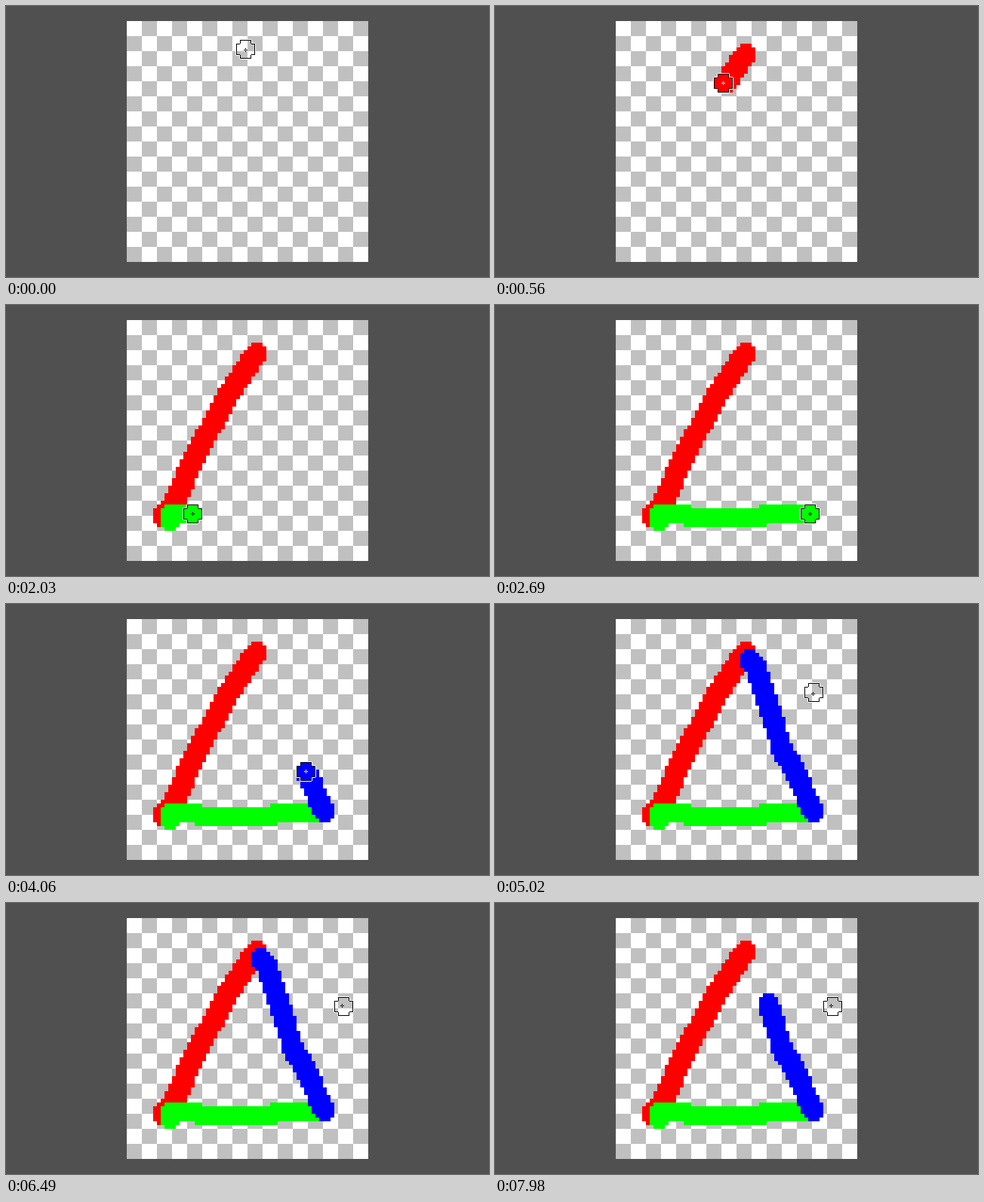
Recreate the animation shown at these times as an HTML page with a canvas. Size 640 px wide and 360 px high, loop 8000 ms.

```html
<!DOCTYPE html>
<html lang="en">
<head>
<meta charset="utf-8">
<title>Triangle painting</title>
<style>
html, body { margin: 0; width: 100%; height: 100%; overflow: hidden; background: #505050; }
canvas { display: block; }
</style>
</head>
<body>
<canvas id="stage" width="640" height="360"></canvas>
<script>
const ctx = document.getElementById('stage').getContext('2d');
const LOOP = 8000, CELL = 5, LEFT = 160, TOP = 20;

const lerp = (a, b, f) => a + (b - a) * f;
const linear = f => f;
const smooth = f => f * f * (3 - 2 * f);
const easeOut = f => 1 - (1 - f) ** 2.6;
const progress = (t, start, end) => Math.min(1, Math.max(0, (t - start) / (end - start)));

// Every grid cell the brush centre passes on the way through the key points.
function cellsAlong(points) {
  const cells = [points[0]], samples = 999;
  for (let i = 1; i < points.length; i++) {
    for (let k = 1; k <= samples; k++) {
      const [x, y] = [0, 1].map(n => Math.round(lerp(points[i - 1][n], points[i][n], k / samples)));
      const [lastX, lastY] = cells[cells.length - 1];
      if (x !== lastX || y !== lastY) cells.push([x, y]);
    }
  }
  return cells;
}

function stroke(start, end, ease, color, light, hidden, points) {
  const cells = cellsAlong(points);
  const last = t => Math.floor(ease(progress(t, start, end)) * (cells.length - 1));
  return {
    start, color, light, hidden, cells, last,
    pointer: t => {
      const [x, y] = cells[last(t)];
      return [LEFT + x * CELL + 2, TOP + y * CELL + 2];
    }
  };
}

function glide(start, end, x, y) {
  return {
    start, light: false,
    pointer: (t, from) => {
      const f = progress(t, start, end);
      return [Math.round(lerp(from[0], x, f)), Math.round(lerp(from[1], y, f))];
    }
  };
}

const red = stroke(340, 1070, smooth, '#f00', true, [5760, 6150],
  [[34, 8], [25.5, 21], [17.5, 36], [12, 48], [9, 52]]);
const green = stroke(1970, 2690, easeOut, '#0f0', false, [5520, 6340],
  [[11, 53], [11, 51], [18, 51], [19, 52], [38, 52], [39, 51], [51, 51]]);
const blue = stroke(3960, 4810, easeOut, '#00f', true, [5300, 6490],
  [[52, 51], [47, 40], [43.5, 34], [41.5, 27], [36.5, 12], [35, 10]]);

const timeline = [
  glide(0, 180, 332, 67), red,
  glide(1300, 1350, 217, 292), green,
  glide(2870, 2930, 407, 297),
  glide(3460, 3620, 404, 257), glide(3620, 3780, 422, 277), blue,
  glide(4940, 5020, 421, 119), glide(5020, 5250, 445, 136)
];

// The blue stroke is taken back cell by cell from its tip.
const UNDONE = 17;
const undone = t => Math.floor(UNDONE * progress(t, 6780, 7980));

function rect(color, x, y, w, h) {
  ctx.fillStyle = color;
  ctx.fillRect(x, y, w, h);
}

function drawDab(color, [x, y]) {
  const px = LEFT + x * CELL, py = TOP + y * CELL;
  rect(color, px - 5, py - 10, 15, 25);
  rect(color, px - 10, py - 5, 25, 15);
}

// Brush edge: each side is a separate line, so the corner pixels stay open.
function drawOutline(color, cx, cy, offset) {
  const R = 12.5, r = 7.5, corners = [];
  let side = [[-r, -R], [r, -R], [r, -r]];
  for (let turn = 0; turn < 4; turn++) {
    corners.push(...side);
    side = side.map(([x, y]) => [-y, x]);
  }
  ctx.beginPath();
  corners.forEach(([x0, y0], i) => {
    const [x1, y1] = corners[(i + 1) % corners.length];
    const dx = cx + Math.sign(y1 - y0) * offset, dy = cy - Math.sign(x1 - x0) * offset;
    ctx.moveTo(x0 + dx, y0 + dy);
    ctx.lineTo(x1 + dx, y1 + dy);
  });
  ctx.strokeStyle = color;
  ctx.lineWidth = 1;
  ctx.stroke();
}

function drawPointer([x, y], light) {
  const centre = (v, origin) => origin + (Math.floor((v - origin) / CELL) + 0.5) * CELL;
  const cx = centre(x, LEFT), cy = centre(y, TOP);
  drawOutline('#fff', cx, cy, 0.5);
  drawOutline('#000', cx, cy, -0.5);
  const color = light ? '#fff' : '#000';
  for (const arm of [-2, 1]) {
    rect(color, x + arm, y, 2, 1);
    rect(color, x, y + arm, 1, 2);
  }
}

function draw(t) {
  rect('#505050', 0, 0, 640, 360);
  for (let row = 0; row < 16; row++) {
    for (let col = 0; col < 16; col++) {
      rect((row + col) % 2 ? '#c0c0c0' : '#fff', LEFT + col * 20, TOP + row * 20, 20, 20);
    }
  }
  for (const s of [red, green, blue]) {
    const hidden = t >= s.hidden[0] && t < s.hidden[1];
    if (t < s.start || hidden) continue;
    const count = s.last(t) + 1 - (s === blue ? undone(t) : 0);
    s.cells.slice(0, count).forEach(cell => drawDab(s.color, cell));
  }
  let position = [317, 58], light = false;
  for (const step of timeline.filter(s => t >= s.start)) {
    position = step.pointer(t, position);
    light = step.light;
  }
  drawPointer(position, light);
}

function frame() {
  draw(performance.now() % LOOP);
  requestAnimationFrame(frame);
}
frame();
</script>
</body>
</html>
```
